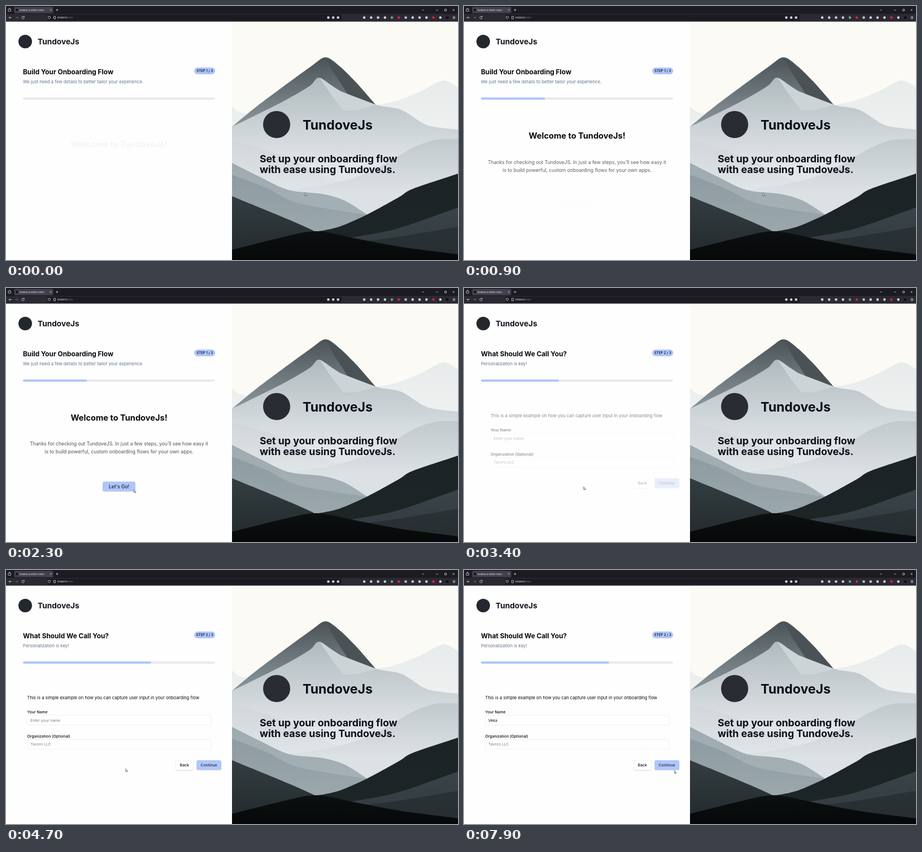
These frames come from a looping animation (800x450 px, 8 s). An HTML page:

```html
<!DOCTYPE html>
<html lang="en">
<head>
<meta charset="utf-8">
<title>Onboarding flow</title>
<style>
  html, body { margin: 0; width: 100%; height: 100%; overflow: hidden; background: #fefefe; }
  svg { display: block; width: 100%; height: 100%; font-family: Inter, "Noto Sans", sans-serif; }
  .b { font-weight: 700; }
  .m { font-weight: 500; }
  .mid { text-anchor: middle; }
  .hint { fill: #7b8088; }
  .line { fill: none; stroke: #eeeef2; stroke-width: .8; }
</style>
</head>
<body>
<svg viewBox="0 0 800 450" xmlns="http://www.w3.org/2000/svg">
  <defs>
    <clipPath id="rightHalf"><rect x="400" y="27" width="400" height="423"/></clipPath>
    <filter id="soft" x="-20%" y="-40%" width="140%" height="200%">
      <feDropShadow dx="0" dy=".8" stdDeviation=".7" flood-color="#223" flood-opacity=".18"/>
    </filter>
    <g id="grads"></g>
  </defs>
  <rect width="800" height="450" fill="#fefefe"/>

  <g id="scene" clip-path="url(#rightHalf)"></g>
  <circle cx="479" cy="210" r="24" fill="#292c33"/>
  <g class="b" fill="#0a0d18">
    <text x="525" y="218.5" font-size="23">TundoveJs</text>
    <text x="449" y="276.6" font-size="17.7">Set up your onboarding flow</text>
    <text x="449" y="296" font-size="17.7">with ease using TundoveJs.</text>
  </g>

  <g id="chrome">
    <rect width="800" height="14" fill="#1c1b22"/>
    <rect y="14" width="800" height="13.7" fill="#2b2a33"/>
    <rect x="14.5" y="1.5" width="69" height="11.3" rx="1.6" fill="#42414d"/>
    <rect x="73" y="15.3" width="521" height="10.6" rx="1.5" fill="#1c1b22"/>
    <text x="23" y="8.6" font-size="3.8" fill="#f4f4f8">TundoveJs Starter Demo</text>
    <text x="91" y="22" font-size="3.8" fill="#f4f4f8">testbench<tspan fill="#85858f">:4100</tspan></text>
    <circle cx="19.4" cy="7" r="1.9" fill="#08080a"/>
    <g fill="none" stroke="#e8e8ee" stroke-width=".7">
      <path d="M4 5.5H8.5V9.3H4ZM5 4H7.5"/>
      <path d="M78.2 5.8l2.4 2.4m0-2.4l-2.4 2.4M88.4 7h4M90.4 5v4"/>
      <path d="M736.3 6.2l1.7 1.7 1.7-1.7M761.3 7.2h3.6M776.5 5.7h3v3h-3ZM790.6 5.5l3 3m0-3l-3 3"/>
      <path d="M10 20.5H5.2m2-2l-2 2 2 2M31.8 19a2.2 2.2 0 1 0 .5 2M32.4 17.8v1.7h-1.7"/>
      <path d="M16.5 20.5h4.8m-2-2l2 2-2 2" stroke="#77767f"/>
      <path d="M76.5 18.2l2 .7c0 2-.5 3.2-2 4-1.5-.8-2-2-2-4ZM84.5 18.3h3v4.4h-3Z"/>
      <path d="M790.7 18.8h4.4m-4.4 1.7h4.4m-4.4 1.7h4.4"/>
    </g>
    <g id="addons"></g>
  </g>

  <circle cx="34" cy="63" r="12" fill="#25272e"/>
  <text x="56" y="67.9" font-size="13.7" class="b" fill="#15171f">TundoveJs</text>
  <text id="heading" x="30" y="121.3" font-size="11.85" class="b" fill="#08090d"></text>
  <text id="sub" x="30" y="137" font-size="7.75" fill="#64748b"></text>
  <rect x="333" y="109" width="37.3" height="12" rx="6" fill="#afc6fa"/>
  <text id="step" x="351.8" y="117" font-size="5.8" letter-spacing=".15" class="b mid" fill="#20283c"></text>
  <rect x="30" y="162" width="340" height="4" rx="2" fill="#e9eaee"/>
  <rect id="bar" x="30" y="162" height="4" rx="2" fill="#b1c6f8"/>

  <g id="intro">
    <text id="welcome" class="b mid" x="200" y="235" font-size="14.6" fill="#0a0b10">Welcome to TundoveJs!</text>
    <g id="blurb" class="mid" font-size="8.58" fill="#4d5057">
      <text x="200" y="279">Thanks for checking out TundoveJS. In just a few steps, you’ll see how easy it</text>
      <text x="200" y="293">is to build powerful, custom onboarding flows for your own apps.</text>
    </g>
    <g id="go">
      <rect x="171" y="343" width="58" height="17.3" rx="3" fill="#afc6fb" filter="url(#soft)"/>
      <text class="m mid" x="200" y="354.8" font-size="8.5" fill="#20242e">Let's Go!</text>
    </g>
  </g>

  <g id="form" fill="#0a0b10">
    <text x="37.5" y="229.3" font-size="7.68">This is a simple example on how you can capture user input in your onboarding flow</text>
    <g font-size="6.85">
      <text class="m" x="37.5" y="254">Your Name</text>
      <rect class="line" x="37.4" y="257.3" width="325.4" height="17.6" rx="3"/>
      <g id="focus" fill="none">
        <rect x="37" y="256.9" width="326.2" height="18.4" rx="3.4" stroke="#d3d5da" stroke-width="1.8"/>
        <rect x="37.4" y="257.3" width="325.4" height="17.6" rx="3" stroke="#9da1a9" stroke-width=".7"/>
      </g>
      <text id="ask" class="hint" x="43" y="268.8">Enter your name</text>
      <text id="typed" x="43" y="268.8"></text>
      <rect id="caret" y="262.8" width=".6" height="7.4"/>
      <text class="m" x="37.5" y="296.6">Organization (Optional)</text>
      <rect class="line" x="37.4" y="300" width="325.4" height="17.6" rx="3"/>
      <text class="hint" x="43" y="311.4">Tavoro LLC</text>
    </g>
  </g>
  <g id="nav" class="m mid" font-size="6.75">
    <rect x="300.3" y="337.2" width="31" height="17" rx="3" fill="#fff" stroke="#ececf0" stroke-width=".7" filter="url(#soft)"/>
    <text x="315.8" y="348.1" fill="#0a0b10">Back</text>
    <rect x="337.2" y="337" width="44" height="17.3" rx="3" fill="#b0c6fb" filter="url(#soft)"/>
    <text x="359.2" y="348.1" fill="#272c38">Continue</text>
  </g>

  <g id="cursor">
    <path id="arrow" d="M0 0V5.2L1.2 4.1 2 5.9 2.9 5.5 2.1 3.8H3.7Z" fill="#fff" stroke="#25252b" stroke-width=".55"/>
    <path id="beam" d="M-1-2.8H1M0-2.8V2.8M-1 2.8H1" fill="none" stroke="#303036" stroke-width=".6"/>
  </g>
</svg>
<script>
const LOOP = 8000;
const $ = id => document.getElementById(id);
const clamp = v => Math.max(0, Math.min(1, v));
const span = (t, start, length) => clamp((t - start) / length);
const easeOut = p => 1 - (1 - p) ** 2;
const easeInOut = p => p * p * (3 - 2 * p);
const fade = (id, v) => $(id).setAttribute('opacity', v);
const move = (id, x, y) => $(id).setAttribute('transform', `translate(${x} ${y})`);
const show = (id, on) => $(id).setAttribute('visibility', on ? 'visible' : 'hidden');

// Smooth line through a few "x,y" key points
function curve(text) {
  const p = text.split(' ').map(s => s.split(',').map(Number));
  const bend = (q, from, to, k) => q.map((v, n) => v + (to[n] - from[n]) * k);
  return p.slice(1).reduce((d, c, i) => {
    const a = p[i - 1] || p[i], b = p[i], e = p[i + 2] || c;
    return d + `C${bend(b, a, c, 1 / 7)} ${bend(c, b, e, -1 / 7)} ${c}`;
  }, `M${p[0]}`);
}

// One mountain layer, shaded downwards from its highest point
function ridge(points, top, bottom, depth) {
  const id = 'r' + $('scene').children.length;
  const y = Math.min(...points.split(' ').map(s => +s.split(',')[1]));
  $('grads').innerHTML += `<linearGradient id="${id}" gradientUnits="userSpaceOnUse" x1="0" x2="0" y1="${y}" y2="${y + depth}">
    <stop stop-color="${top}"/><stop offset="1" stop-color="${bottom}"/></linearGradient>`;
  $('scene').innerHTML += `<path d="${curve(points)}V460H400Z" fill="url(#${id})"/>`;
}

function facet(d, fill) {
  $('scene').innerHTML += `<path d="${d}" fill="${fill}"/>`;
}

function buildScene() {
  facet('M400 27H800V450H400Z', '#fbfaf5');
  ridge('400,178 440,191 655,175 725,155 773,132 800,144', '#e8ebeb', '#eff1f1', 90);
  ridge('400,214 445,177 537,109 566,91 593,109 622,138 655,176', '#4b5356', '#89949a', 118);
  facet('M566 91L593 109 622 138 655 176 606 158 580 118Z', '#4a5255');
  ridge('400,214 487,171 537,142 555,127 592,151 655,175 700,184 745,211 800,219', '#b0babe', '#e1e6e8', 155);
  facet('M555 127L592 151 655 175 620 185H597L576 158Z', '#cdd4d7');
  ridge('400,237 470,258 550,292 600,312 800,312', '#d0d6d9', '#e0e5e7', 90);
  ridge('500,326 560,318 620,303 670,280 720,251 760,237 800,236', '#c1c9cc', '#dce1e4', 95);
  ridge('400,278 450,303 500,326 560,333 600,345 640,370', '#9eabb0', '#a5b1b6', 110);
  ridge('400,299 460,322 520,350 640,370', '#8e9ca2', '#9aa7ac', 100);
  ridge('400,337 548,400 570,430', '#343d41', '#252d30', 90);
  ridge('530,402 548,400 590,391 640,369 695,339 720,324 800,297', '#1c2325', '#1d2527', 120);
  ridge('600,412 690,395 800,357', '#3a4348', '#343d41', 60);
  ridge('600,420 680,411 800,391', '#2a3236', '#262e31', 50);
  ridge('400,432 480,412 548,399 620,412 700,427 800,440', '#0c1011', '#060809', 50);
}

function buildAddons() {
  const plain = '#d4d4dc', accents = { 4: '#7fa18b', 5: '#d5263c', 6: '#b9c9ef', 10: '#e02436', 12: '#0a0a0d' };
  const icon = (x, i, fill) => i % 2
    ? `<circle cx="${x}" cy="20.5" r="2.2" fill="${fill}"/>`
    : `<rect x="${x - 2}" y="18.5" width="4" height="4" rx=".8" fill="${fill}"/>`;
  let marks = '';
  for (let i = 0; i < 3; i++) marks += icon(570.5 + 8.6 * i, i, plain);
  for (let i = 0; i < 13; i++) marks += icon(634 + 12.25 * i, i, accents[i] || plain);
  $('addons').innerHTML = marks;
}

function pointer(t) {
  let x = 529, y = 331;
  const glide = (toX, toY, start, length) => {
    const p = easeInOut(span(t, start, length));
    x += (toX - x) * p;
    y += (toY - y) * p;
  };
  glide(226.5, 357.3, 1150, 1000);
  glide(211.7, 352, 2400, 300);
  glide(136, 266, 5150, 500);
  glide(372.3, 355, 7150, 600);
  return [x, y];
}

function rise(id, p) {
  fade(id, easeOut(p));
  move(id, 0, 16 * (1 - p) ** 2);
}

function draw(t) {
  const second = t >= 3150;
  $('heading').textContent = second ? 'What Should We Call You?' : 'Build Your Onboarding Flow';
  $('sub').textContent = second ? 'Personalization is key!' : 'We just need a few details to better tailor your experience.';
  $('step').textContent = `STEP ${second ? 2 : 1} / 3`;
  const steps = easeInOut(span(t, 0, 500)) + easeInOut(span(t, 3250, 500));
  $('bar').setAttribute('width', 340 / 3 * steps);

  const out = span(t, 3130, 170);
  fade('intro', 1 - out);
  move('intro', -10 * out, 0);
  rise('welcome', span(t, -12, 700));
  rise('blurb', span(t, 400, 700));
  const pop = easeOut(span(t, 900, 600)), size = .9 + .1 * pop;
  fade('go', pop);
  $('go').setAttribute('transform', `translate(200 351.6) scale(${size}) translate(-200 -351.6)`);

  fade('form', span(t, 3300, 220));
  move('form', 15 * Math.exp(-Math.max(0, t - 3300) / 217), 0);
  fade('nav', span(t, 3320, 300));

  const count = Math.max(0, Math.min(4, Math.floor((t - 6400) / 130) + 1));
  const focused = t >= 5700 && t < 7800;
  $('typed').textContent = 'Veka'.slice(0, count);
  show('ask', !count);
  show('focus', focused);
  show('caret', focused);
  $('caret').setAttribute('x', 43 + (count ? $('typed').getComputedTextLength() + .3 : 0));

  const [x, y] = pointer(t);
  const inField = t > 3400 && x < 363 && y > 257 && y < 275;
  move('cursor', x, y);
  show('arrow', !inField);
  show('beam', inField);
}

buildScene();
buildAddons();
const begin = performance.now();
function tick() {
  draw((performance.now() - begin) % LOOP);
  requestAnimationFrame(tick);
}
tick();
</script>
</body>
</html>
```
